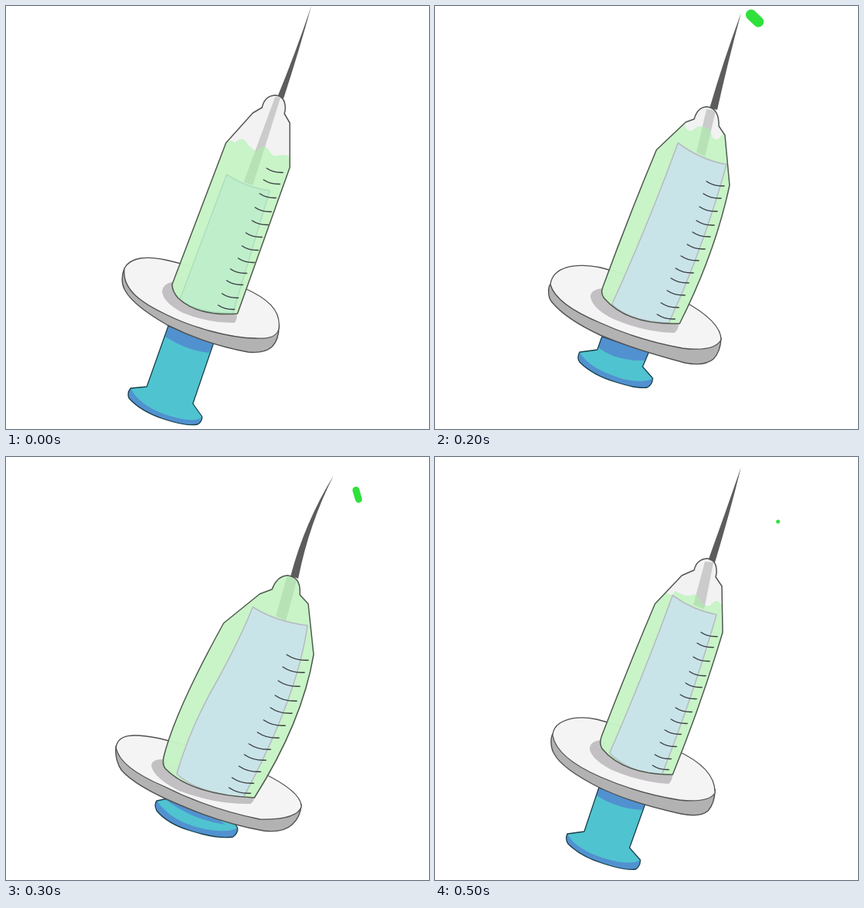
These frames come from a looping animation (550 by 550 pixels, 600 ms). An HTML page:

```html
<!DOCTYPE html>
<html lang="en">
<head>
<meta charset="utf-8">
<title>Syringe</title>
<style>
html, body { margin: 0; height: 100%; overflow: hidden; background: #fff; }
svg { display: block; width: 100%; height: 100%; }
path { stroke-linejoin: round; stroke-linecap: round; }
</style>
</head>
<body>
<svg id="stage" viewBox="0 0 550 550"></svg>
<script>
// Plunger handle is rod + rim; wave is the liquid surface, clipped to the barrel.
const rest = {
  needle: 'M397 0Q376 62 353 118L361 120Q382 55 397 0Z',
  shade: 'M350 118L309 229L321 233L357 119Z',
  barrel: 'M286 178L321 139L333 132Q336 117 350 116Q364 117 363 135L362 140L369 152V210L301 400Q250 404 224 380Q216 371 216 362Z',
  wave: 'H286Q292 172 298 178Q305 170 311 175Q318 186 326 189Q333 178 341 186Q346 198 356 194Q366 192 370 197',
  top: 178,
  piston: 'M287 219Q312 236 343 240L295 399Q250 400 226 382Z',
  pistonFill: '#bfeecb', pistonLine: '#aedfbd',
  shadow: 'M216 359Q203 362 203 372Q205 386 230 399Q262 412 297 412Q301 408 300 399Z',
  plate: 'M154 341C162 326 184 325 207 330Q265 343 308 366C340 380 357 395 355 418C354 430 340 433 325 432C290 432 240 417 208 401C180 388 150 370 154 341Z',
  side: 'M154 341C150 350 150 362 155 370Q165 389 210 415Q260 440 315 450Q336 452 346 443Q355 434 355 415Z',
  rod: 'M211 416L183 495L162 497',
  rim: 'Q157 503 160 510Q175 527 205 537Q235 547 249 544Q255 541 255 534',
  rimStart: '162 497', rimTop: 'Q250 542 220 535Q175 523 162 497Z',
  rodEnd: 'L243 517L270 438Z',
  band: 'M211 416L207 430Q235 448 264 451L270 438Z',
  tickWidth: 21,
  ticks: [339,211, 335,226, 330,244, 324,262, 320,279, 312,295, 307,312, 302,328, 292,342, 287,357, 281,374, 276,389]
};

const press = {
  needle: 'M398 13Q377 74 355 135L364 137Q383 74 398 13Z',
  shade: 'M351 136L336 192L350 198L362 137Z',
  barrel: 'M286 191L321 154L337 147Q340 133 354 132Q367 134 366 151L365 156L373 168L374 228Q346 322 309 413Q245 413 217 379Q213 372 217 362Q250 276 286 191Z',
  wave: 'H301Q307 183 312 174Q325 182 333 180Q340 176 344 184Q348 196 358 193Q366 183 371 190L375 193',
  top: 176,
  piston: 'M309 180Q335 199 366 205Q335 312 295 413Q255 412 227 385Q271 284 309 180Z',
  shadow: 'M217 368Q202 369 201 379Q203 393 230 407Q268 423 304 425Q309 420 309 412Z',
  plate: 'M153 362C154 343 180 335 210 341Q270 356 315 382Q365 405 364 437Q355 450 318 446Q266 438 215 416Q158 391 153 362Z',
  side: 'M153 360C150 365 150 378 155 386Q165 405 212 429Q255 450 320 464Q345 469 355 460Q364 450 364 432Z',
  rod: 'M213 430L194 487L172 490',
  rim: 'Q169 497 173 503Q190 520 220 529Q248 538 261 536Q267 532 267 524',
  rimStart: '172 490', rimTop: 'Q256 531 228 524Q185 513 172 490Z',
  rodEnd: 'L253 508L273 452Z',
  band: 'M213 430L210 440Q235 457 269 459L273 452Z',
  tickWidth: 21,
  ticks: [346,228, 341,242, 336,260, 331,279, 326,294, 319,309, 313,326, 307,341, 299,355, 293,371, 286,387, 283,401]
};

const squeeze = {
  needle: 'M398 9Q376 68 357 133L367 135Q380 76 398 9Z',
  shade: 'M353 134L340 190L351 196L365 136Z',
  barrel: 'M288 187L326 151L337 147Q341 132 353 131Q368 132 369 152L369 156L377 168L383 233Q364 322 318 413Q250 415 220 380Q215 374 218 366Q252 273 288 187Z',
  wave: 'H324Q328 166 336 161Q343 154 351 158Q358 158 361 171Q366 177 372 169Q375 162 384 168',
  top: 153,
  piston: 'M316 178Q345 200 379 206Q349 315 304 412Q255 411 230 388Q277 285 316 178Z',
  shadow: 'M219 367Q203 368 202 378Q205 394 232 407Q272 424 311 425Q317 421 317 412Z',
  plate: 'M150 362C153 340 180 333 215 340Q275 355 322 383Q372 410 372 434Q363 450 322 445Q263 434 215 412Q157 388 150 362Z',
  side: 'M150 362C147 365 146 378 152 385Q170 407 215 428Q260 447 325 464Q350 469 362 459Q371 450 372 432Z',
  rod: 'M217 430L211 447L188 450',
  rim: 'Q184 457 188 463Q205 480 235 489Q263 498 276 496Q283 492 283 484',
  rimStart: '188 450', rimTop: 'Q272 491 245 485Q200 472 188 450Z',
  rodEnd: 'L270 469L278 450Z',
  band: 'M217 430L212 444Q235 462 273 461L278 450Z',
  tickWidth: 23,
  ticks: [353,228, 349,244, 344,261, 340,279, 335,294, 328,310, 320,325, 313,341, 307,354, 302,370, 294,386, 289,401]
};

const burst = {
  needle: 'M426 24Q388 86 370 155L380 158Q394 87 426 24Z',
  shade: 'M365 156L351 207L364 213L379 157Z',
  barrel: 'M283 216L330 178L346 172Q352 155 366 154Q384 156 382 179L393 191L400 257Q385 345 323 443Q240 439 207 405Q203 400 205 390Q220 330 283 216Z',
  wave: 'H410',
  top: 140,
  piston: 'M321 195Q350 214 392 219Q379 312 309 442Q250 438 222 412Q240 350 275 290Q305 235 321 195Z',
  shadow: 'M204 393Q189 393 189 402Q193 418 225 434Q273 452 318 451Q323 447 323 442Z',
  plate: 'M143 378C145 360 165 359 200 366Q270 383 330 409Q385 435 384 455Q378 472 330 471Q262 457 205 428Q148 404 143 378Z',
  side: 'M143 376C142 385 143 396 150 407Q168 428 225 452Q280 476 335 486Q360 489 372 478Q383 468 384 452Z',
  rod: 'M230 440L196 447',
  rim: 'Q192 452 196 460Q210 477 240 486Q275 497 295 494Q302 489 301 482',
  rimStart: '196 447', rimTop: 'Q290 490 255 483Q215 474 196 447Z',
  rodEnd: 'L290 465Z',
  band: 'M200 440Q240 472 285 478L250 450Z',
  tickWidth: 28,
  ticks: [365,257, 360,273, 354,291, 350,310, 344,326, 335,342, 327,358, 316,373, 310,387, 303,402, 294,417, 290,430]
};

// Each step: pose, its offset, and the drop as x1, y1, x2, y2, width.
const steps = [
  [rest, '0 0'],
  [press, '0 0', [399.5, 12, 401, 11.8, 7.5]],
  [squeeze, '0 0', [411, 11.5, 420.5, 20.5, 14]],
  [burst, '0 0', [455, 43, 458.5, 55, 9]],
  [squeeze, '1 22', [431.5, 75.5, 433, 82.5, 6]],
  [press, '0 0', [446, 84, 446.1, 84, 5]]
];

const shape = (d, fill, stroke = 'none', width = 1.4, extra = '') =>
  `<path d="${d}" fill="${fill}" stroke="${stroke}" stroke-width="${width}" ${extra}/>`;

function marks({ ticks, tickWidth: w }) {
  let d = '';
  for (let i = 0; i < ticks.length; i += 2)
    d += `M${ticks[i]} ${ticks[i + 1]}q${w * 0.42} ${w * 0.29} ${w} ${w * 0.26}`;
  return d;
}

function draw([p, offset, drop]) {
  const handle = p.rod + p.rim + p.rodEnd;
  return `<clipPath id="glass"><path d="${p.barrel}"/></clipPath><g transform="translate(${offset})">`
    + shape(handle, '#50c3d0')
    + shape(p.band, '#5191d0')
    + shape(`M${p.rimStart}${p.rim}${p.rimTop}`, '#5191d0')
    + shape(handle, 'none', '#173f4a', 1.3)
    + shape(p.side, '#b2b2b2', '#505050')
    + shape(p.plate, '#f4f4f4', '#505050', 1.3)
    + shape(p.shadow, '#c2c0c2')
    + shape(p.needle, '#5c5c5c')
    + shape(p.barrel, '#f2f2f2', 'none', 0, 'fill-opacity=".93"')
    + '<g clip-path="url(#glass)">'
    + shape(p.shade, '#000', 'none', 0, 'fill-opacity=".16"')
    + shape(`M150 ${p.top}${p.wave}V470H150Z`, '#a7f6a6', 'none', 0, 'fill-opacity=".55"')
    + shape(p.piston, p.pistonFill || '#c9e4e8', p.pistonLine || '#b7bcc2', 1.6)
    + '</g>'
    + shape(p.barrel, 'none', '#50594f', 1.5)
    + shape(marks(p), 'none', '#3c4044', 1.5)
    + '</g>'
    + (drop ? shape(`M${drop[0]} ${drop[1]}L${drop[2]} ${drop[3]}`, 'none', '#30e03c', drop[4]) : '');
}

const stage = document.getElementById('stage');
const start = performance.now();
let shown = -1;

function tick() {
  const n = Math.floor(Math.max(0, performance.now() - start) / 100) % steps.length;
  if (n !== shown) stage.innerHTML = draw(steps[shown = n]);
  requestAnimationFrame(tick);
}
tick();
</script>
</body>
</html>
```
